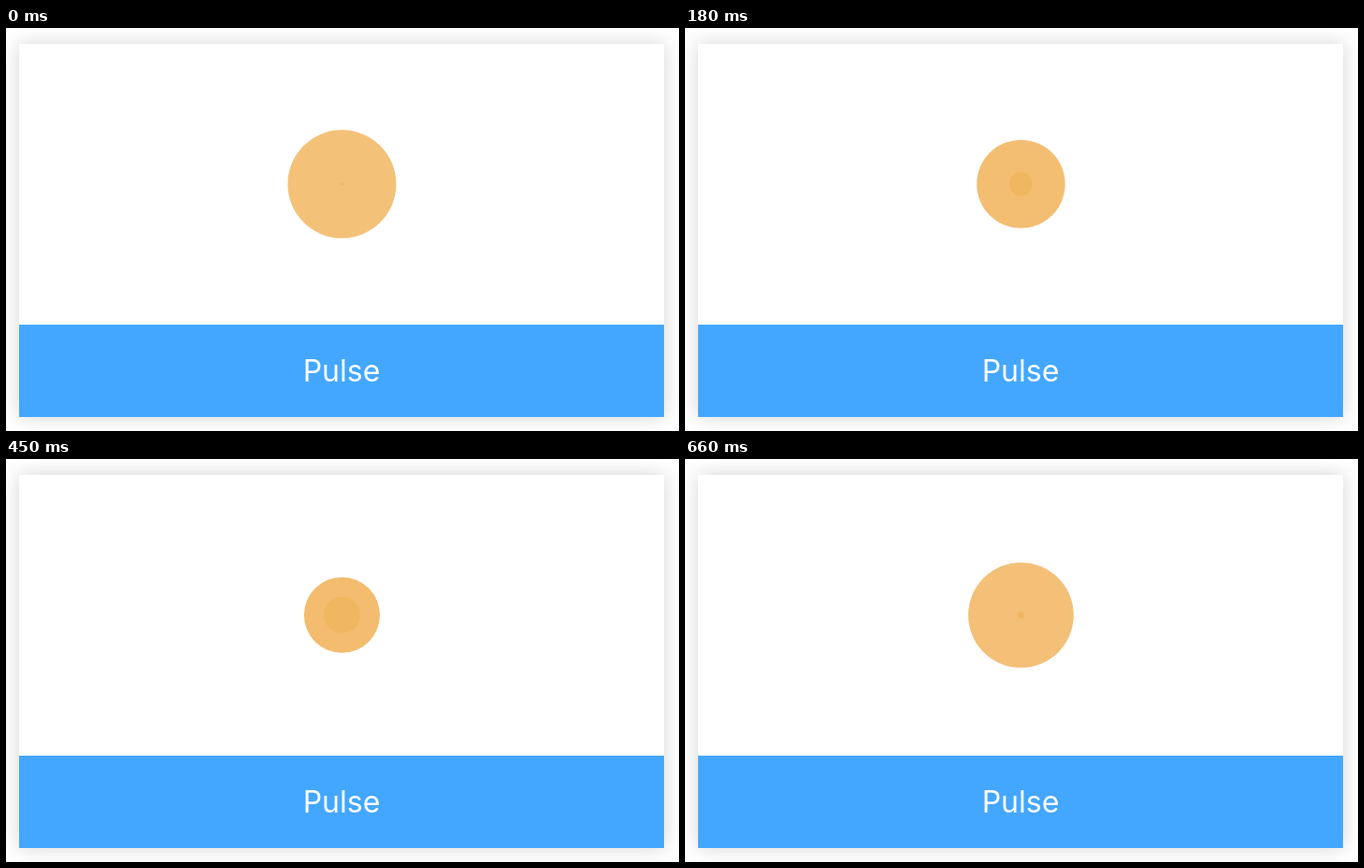
An HTML page with a canvas for the animation above (0.69 s loop, 720 by 432 pixels).

```html
<!DOCTYPE html>
<html lang="en">
<head>
<meta charset="utf-8">
<title>Pulse</title>
<style>
  html, body { margin: 0; width: 100%; height: 100%; overflow: hidden; background: #fff; }
  canvas { display: block; }
</style>
</head>
<body>
<canvas id="stage" width="720" height="432"></canvas>
<script>
const ctx = document.getElementById('stage').getContext('2d');
const LOOP = 690, STEP = 30;
const CENTER = { x: 359.4, y: 167.3 }, RADIUS = 60;

// cubic-bezier(.42, 0, .58, 1), solved for progress x by bisection
function easeInOut(x) {
  let lo = 0, hi = 1;
  for (let i = 0; i < 24; i++) {
    const s = (lo + hi) / 2, r = 1 - s;
    if (1.26 * s * r * r + 1.74 * s * s * r + s * s * s < x) lo = s;
    else hi = s;
  }
  return lo * lo * (3 - 2 * lo);
}

function mix(from, to, k) {
  return `rgb(${from.map((c, i) => Math.round(c + (to[i] - c) * k)).join(',')})`;
}

function disc(radius, color) {
  ctx.fillStyle = color;
  ctx.beginPath();
  ctx.arc(CENTER.x, CENTER.y, radius, 0, Math.PI * 2);
  ctx.fill();
}

function drawCard() {
  ctx.fillStyle = '#fff';
  ctx.fillRect(0, 0, 720, 432);

  ctx.save();
  ctx.shadowColor = 'rgba(0, 0, 0, 0.17)';
  ctx.shadowBlur = 20;
  ctx.fillRect(14, 17, 690, 400);
  ctx.restore();

  ctx.fillStyle = '#44a7ff';
  ctx.fillRect(14, 318, 690, 99);

  ctx.fillStyle = '#fff';
  ctx.font = '32px Inter, Roboto, sans-serif';
  ctx.textAlign = 'center';
  ctx.fillText('Pulse', 359, 379);
}

function draw(now) {
  const t = Math.floor((now % LOOP) / STEP) * STEP;
  const grow = easeInOut(0.128 + t * 0.00106);
  const small = Math.min(grow, 1 - grow);

  drawCard();
  disc(RADIUS * (1 - small), mix([244, 193, 122], [243, 186, 104], small * 2));
  disc(RADIUS * small, 'rgb(241,183,96)');
  requestAnimationFrame(draw);
}

requestAnimationFrame(draw);
</script>
</body>
</html>
```
